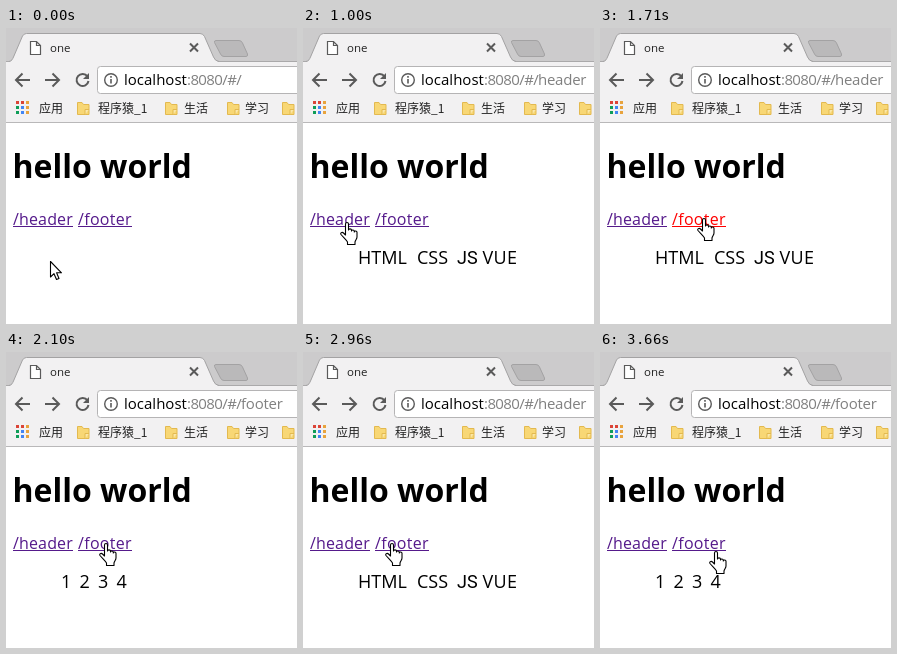
Write an HTML page that moves like this. It is 291 px wide and 296 px high and loops after 3810 ms.

```html
<!DOCTYPE html>
<html lang="zh-CN">
<head>
<meta charset="utf-8">
<title>one</title>
<style>
  html, body { margin: 0; width: 100%; height: 100%; overflow: hidden; background: #fff; }
  svg { display: block; width: 291px; height: 296px; font-family: "Open Sans", "Noto Sans", sans-serif; }
  text { white-space: pre; }
  .url { font-size: 15px; }
  .path { font-size: 15px; letter-spacing: -.25px; fill: #808080; }
  .mark { font: 12px "Noto Sans CJK SC", "Noto Sans CJK", "Noto Sans CJK JP", sans-serif; fill: #222; }
  .link { font-size: 16px; fill: #551a8b; }
  .body { font-size: 18px; }
  .icon { fill: none; stroke: #5a5a5a; stroke-width: 2; }
  .cursor { fill: #fff; stroke: #000; stroke-width: 1.1; stroke-linejoin: round; }
</style>
</head>
<body>
<svg viewBox="0 0 291 296">
  <defs>
    <g id="folder">
      <path d="M.5 1.5h4.5l1.5 2h5.5v10H.5z" fill="#f8d775" stroke="#e3b94f"/>
      <path d="M8 13.5v-5h4" fill="#fbe7a8" stroke="#e3b94f"/>
    </g>
  </defs>

  <!-- tab strip -->
  <rect width="291" height="34" fill="#cccbcc"/>
  <path d="M0 33.5H291" stroke="#aaa9aa"/>
  <rect y="34" width="291" height="61" fill="#f2f1f2"/>
  <path d="M3 34C6 33 6.500 31 7.500 29L16.500 8Q18 5.500 20.500 5.500H194Q197 5.500 198.500 8.500L207.500 29Q209 33 213 34z" fill="#f2f1f2"/>
  <path d="M3 33.500C6 33 6.500 31 7.500 29L16.500 8Q18 5.500 20.500 5.500H194Q197 5.500 198.500 8.500L207.500 29Q209 33 213 33.500" fill="none" stroke="#a3a2a3"/>
  <path d="M210 12.500H233Q235.500 12.500 236.500 15L241.500 26Q242 28.500 240 28.500H218Q215.500 28.500 214.500 26L208.500 14.500Q208 12.500 210 12.500z" fill="#bab9ba" stroke="#a3a2a3"/>
  <path d="M24.500 13.500h6l4 4v9h-10zM30.500 13.500v4h4" fill="#fff" stroke="#5a5a5a" stroke-width="1.200"/>
  <text x="44" y="24" font-size="11.500" fill="#222">one</text>
  <path d="M184 15.500l8 8m0-8l-8 8" class="icon" stroke-width="1.500"/>

  <!-- toolbar -->
  <path d="M24 52H10M16.500 45.500L10 52l6.500 6.500" class="icon"/>
  <path d="M39 52H53M46.500 45.500L53 52l-6.500 6.500" class="icon"/>
  <path d="M81.500 48.500A6 6 0 1 0 82.500 53" class="icon"/>
  <path d="M83 45v6h-6z" fill="#5a5a5a"/>
  <rect x="91.500" y="38.500" width="215" height="27" rx="3" fill="#fff" stroke="#b5b4b5"/>
  <circle cx="105" cy="52" r="6.300" fill="none" stroke="#5a5a5a" stroke-width="1.400"/>
  <path d="M105 51v4.500M105 48v1.700" stroke="#5a5a5a" stroke-width="1.600"/>
  <text class="url" x="118" y="57">localhost</text>
  <text class="url" x="181" y="57" fill="#808080" letter-spacing="-.6">:8080/#/</text>

  <!-- bookmarks -->
  <g id="apps"></g>
  <g id="marks"></g>
  <path d="M0 94.500H291" stroke="#b9b8b9"/>

  <!-- page -->
  <rect y="95" width="291" height="201" fill="#fff"/>
  <text x="6.500" y="150" font-size="32" font-weight="700">hello world</text>
  <g id="toHeader" class="link">
    <text x="7" y="197" letter-spacing=".15">/header</text>
    <rect x="7" y="198" width="60" height="1"/>
  </g>
  <g id="toFooter" class="link">
    <text x="72" y="197" letter-spacing=".3">/footer</text>
    <rect x="72" y="198" width="54" height="1"/>
  </g>
  <g id="header" opacity="0">
    <text class="path" x="235" y="57">header</text>
    <g class="body">
      <text x="55" y="236">HTML</text>
      <text x="114" y="236">CSS</text>
      <text x="154" y="236" font-family="Roboto, sans-serif">JS</text>
      <text x="179.500" y="236" letter-spacing=".4">VUE</text>
    </g>
  </g>
  <g id="footer" opacity="0">
    <text class="path" x="235" y="57">footer</text>
    <text class="body" x="55 73.500 92 110.500" y="236">1234</text>
  </g>

  <path id="arrow" class="cursor" d="M.5 .5V16L4 12.700L6.500 18.500L9 17.500L6.600 11.800H11.500z"/>
  <path id="hand" class="cursor" d="M5.500 13V2a1.500 1.500 0 0 1 3 0V8c0-1.500 3-1.500 3 0V9c0-1.500 2.800-1.300 2.800.2V10c0-1.500 2.700-1.200 2.700.3V15c0 2-1.500 3-2 5v2.500H7.500V20C6.500 18 3 15 1 12.500C0 11 2 9.500 3.500 11z"/>
</svg>
<script>
const LOOP = 3810;
const $ = id => document.getElementById(id);

function add(parent, tag, attrs, text = '') {
  const el = document.createElementNS('http://www.w3.org/2000/svg', tag);
  for (const key in attrs) el.setAttribute(key, attrs[key]);
  el.textContent = text;
  parent.append(el);
}

const dots = ['#db4437', '#db4437', '#e8a33d', '#0f9d58', '#4285f4', '#e8a33d', '#0f9d58', '#4285f4', '#e8a33d'];
dots.forEach((fill, i) => add($('apps'), 'rect',
  { x: 10 + i % 3 * 5, y: 73 + Math.floor(i / 3) * 5, width: 3, height: 3, fill }));

for (const [x, name] of [[33, '应用'], [92, '程序猿_1'], [178, '生活'], [239, '学习']])
  add($('marks'), 'text', { class: 'mark', x, y: 85 }, name);
for (const x of [71, 159, 221, 276])
  add($('marks'), 'use', { href: '#folder', x, y: 73 });

// Each step is [time in ms, value], held until the next one.
function play(el, prop, steps) {
  const frames = steps.map(([t, value]) => ({ offset: t / LOOP, [prop]: value, easing: 'steps(1, end)' }));
  frames.push({ offset: 1, [prop]: steps.at(-1)[1] });
  el.animate(frames, { duration: LOOP, iterations: Infinity });
}

const move = (el, steps) =>
  play(el, 'transform', steps.map(([t, x, y]) => [t, `translate(${x}px, ${y}px)`]));

const show = (el, first, ...times) =>
  play(el, 'opacity', [[0, first], ...times.map((t, i) => [t, (first + i + 1) % 2])]);

const press = (el, ...spans) =>
  play(el, 'fill', [[0, '#551a8b'], ...spans.flatMap(([a, b]) => [[a, '#f00'], [b, '#551a8b']])]);

move($('arrow'), [[0, 44, 233], [300, 44, 230], [370, 44, 222], [450, 43, 212], [530, 43, 204]]);
move($('hand'), [
  [0, 37, 197], [680, 37, 194],
  [1080, 41, 194], [1160, 54, 192], [1240, 71, 191], [1320, 85, 191], [1390, 94, 191], [1480, 97, 190],
  [2030, 93, 191], [2110, 83, 193], [2190, 69, 194], [2270, 56, 194], [2340, 48, 194], [2420, 45, 193],
  [2720, 51, 193], [2800, 61, 192], [2880, 72, 191], [2960, 82, 191], [3030, 88, 192], [3110, 95, 192],
  [3580, 102, 196], [3660, 109, 199]
]);
show($('arrow'), 1, 610);
show($('hand'), 0, 610);

press($('toHeader'), [920, 1000], [2500, 2560]);
press($('toFooter'), [1710, 1860], [3430, 3500]);
show($('header'), 0, 1000, 1860, 2560, 3500);
show($('footer'), 0, 1860, 2560, 3500);
</script>
</body>
</html>
```
